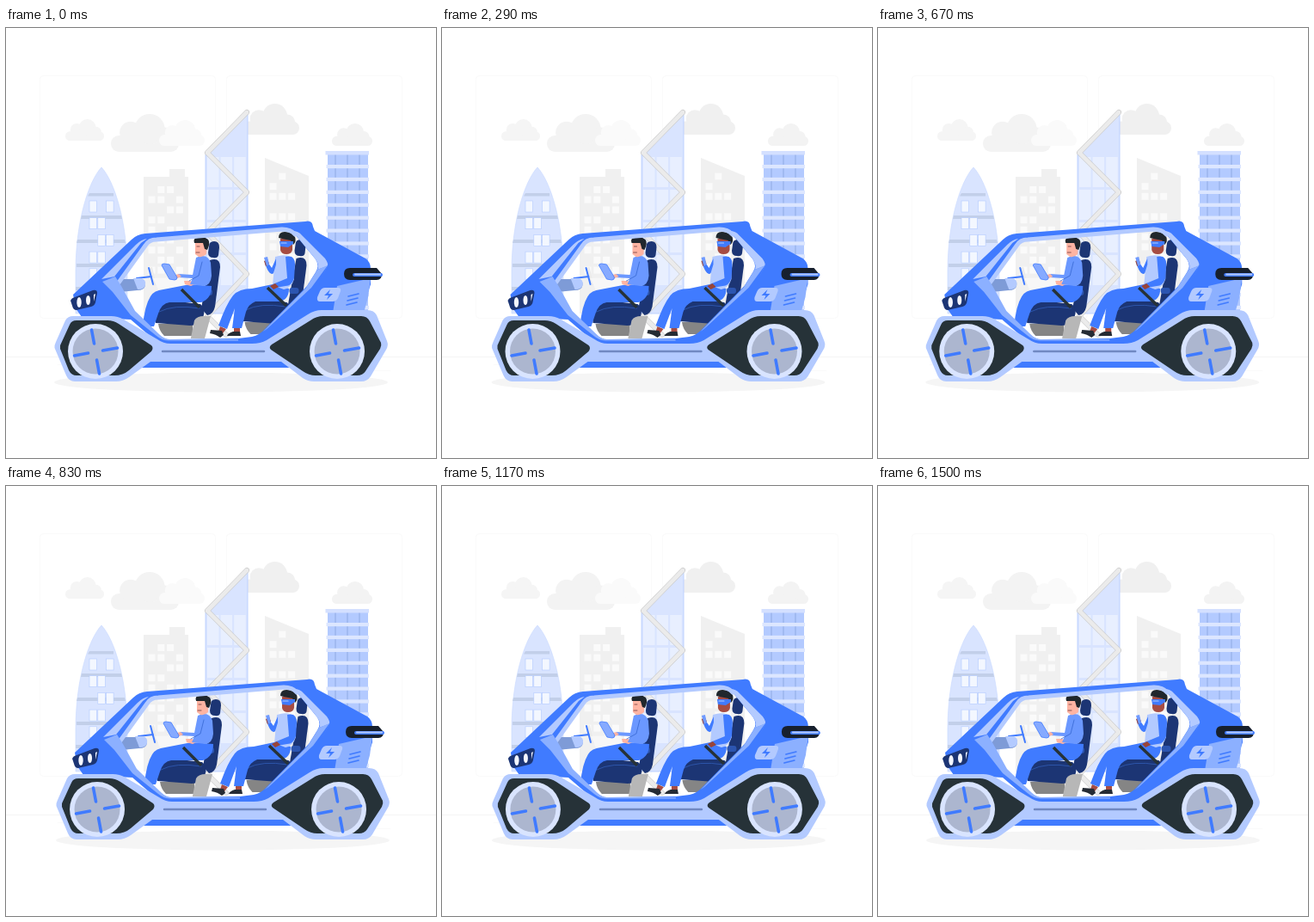
Recreate the animation shown at these times as an HTML page. Size 500x500 px, loop 1.54 s.

```html
<!DOCTYPE html>
<html lang="en">
<head>
<meta charset="utf-8">
<title>Electric car</title>
<style>
html, body { margin: 0; width: 100%; height: 100%; overflow: hidden; background: #fff; }
svg { display: block; width: 100vw; height: 100vh; }
.blue { fill: #407bff; } .mid { fill: #8cb0ff; } .light { fill: #b3caff; } .pale { fill: #d9e4ff; }
.navy { fill: #1c3574; } .dark { fill: #263238; }
.line { fill: none; stroke-linecap: round; stroke-linejoin: round; }
</style>
</head>
<body>
<svg viewBox="0 0 500 500">
  <defs>
    <g id="wheel">
      <circle r="32" class="pale"/><circle r="26.5" fill="#acb6cf"/>
      <path d="M-4.500-25L-1.500-9M8.500-1L25.500-4M1.500 10L4.500 26M-24.500 5L-8.500 2" class="line" stroke="#407bff" stroke-width="3.600"/>
    </g>
    <g id="seat">
      <path d="M177 344H217V358H184Q178 352 177 344Z" fill="#858585"/>
      <path d="M236 254Q236 248 242 248Q248 248 248 255L247 264Q246 268 241 267Q235 267 235 261Z" class="navy"/>
      <path d="M237 270Q249 266 249 278L243 324Q241 333 234 334L227 326Z" class="navy"/>
      <path d="M176 326Q180 317 191 317L226 321Q233 326 229 337Q225 346 214 346L174 343Q173 334 176 326Z" class="navy"/>
      <path d="M178 330Q195 321 225 326" class="line" stroke="#315eb8" stroke-width=".8"/>
      <rect x="229" y="304" width="11" height="7" rx="3" fill="#2c55b0"/>
    </g>
  </defs>

  <g class="line" stroke="#fafafa">
    <rect x="39.5" y="55.5" width="204" height="282" rx="4"/>
    <rect x="256.5" y="55.5" width="204" height="282" rx="4"/>
    <path d="M0 382.5H500" stroke="#f5f5f5"/><path d="M416 398.5H447M60 391.5H85"/>
  </g>
  <g id="clouds"></g>

  <path d="M111 162C96 178 81 225 81 283V332H141V283C141 225 126 178 111 162Z" class="pale" stroke="#c8d8ff" stroke-width=".6"/>
  <path d="M97 192H125V195.500H95ZM88 218H134L135 222H87ZM83 246H138L139 250H82ZM82 274H140V278H82ZM81 301H141V305H81Z" fill="#c2cfe9"/>
  <path d="M160 173H190V164H208V173H212V332H160Z" fill="#f0f0f0"/>
  <path d="M301 151L352 172V332H301Z" fill="#f0f0f0"/>
  <path d="M232 147L281 100V332H232Z" fill="#d9e4ff" stroke="#b3caff" stroke-width=".8"/>
  <rect x="374" y="146" width="47" height="186" fill="#b3caff"/>
  <g id="windows"></g>
  <path d="M280 98L234 145L280 191L234 238L280 286L234 335L256 357" class="line" stroke="#c7c7c7" stroke-width="6"/>
  <path d="M280 98L234 145L280 191L234 238L280 286L234 335L256 357" class="line" stroke="#ebebeb" stroke-width="4.800"/>

  <g id="car">
    <ellipse cx="250" cy="412" rx="194" ry="11.500" fill="#f5f5f5"/>

    <!-- dashboard -->
    <path d="M166 279L170 278L175 299L171 300Z" fill="#ebebeb"/>
    <path d="M171 291L206 290L211 302L177 304Z" fill="#f7f7f7"/>
    <path d="M152 291L169 289M166 279L171 298" class="line" stroke="#407bff" stroke-width="2"/>
    <path d="M122 292H154Q163 292 162 299Q161 305 153 305L132 307Q124 303 122 292Z" fill="#7e9bd7"/>
    <path d="M148 291H157Q163 292 162 299Q161 304 153 304Z" class="light"/>

    <!-- front passenger -->
    <use href="#seat"/>
    <path d="M215 360L219 340Q222 335 230 335H238L231 361H215Z" fill="#b7b7b7"/>
    <path d="M214 298L239 300Q239 315 227 319L190 319Q181 320 177 332L172 347H159Q161 323 168 312Q172 305 183 304Z" class="blue"/>
    <path d="M207 294L214 294L222 297L215 300L208 298Z" fill="#ffb4a2"/>
    <path d="M221 267Q234 261 238 273L239 288Q238 299 230 300L214 298L217 291L200 290V286L217 287Z" fill="#6b98ff"/>
    <path d="M228 272L224 288L213 294" class="line" stroke="#3767d2" stroke-width=".8"/>
    <path d="M220 250L234 249L233 263Q229 267 224 266L220 263Z" fill="#ffb4a2"/>
    <path d="M219 250Q217 244 223 244Q229 241 235 246Q238 250 234 258L231 257L229 250Z" fill="#20272d"/>
    <path d="M222 254H225M221 261H225" class="line" stroke="#6b3b3e" stroke-width=".8"/>
    <path d="M194 288L201 286L204 289L197 292Z" fill="#ffb4a2"/>
    <path d="M181 276Q181 274 184 274L190 275L199 290Q199 293 196 293L190 292Z" fill="#86aaff" stroke="#407bff" stroke-width=".8"/>
    <path d="M204 304L225 325" stroke="#263238" stroke-width="3.500"/>

    <!-- rear passenger -->
    <use href="#seat" x="100.500" y="-2"/>
    <path d="M249 347L256 350L252 355L247 353ZM265 348H272V354H265Z" fill="#a64c43"/>
    <path d="M238 351L251 352L253 357L249 360Q244 356 237 355ZM264 353H272L273 358H257Q258 355 264 353Z" fill="#252b34"/>
    <path d="M310 298L329 303Q329 316 318 318L290 318Q282 321 279 330L274 349H263L266 326L257 350L247 346Q256 321 264 311Q271 303 286 303Z" class="blue"/>
    <path d="M313 266Q328 261 335 270L335 292Q332 302 323 304L310 299Z" class="light"/>
    <path d="M325 266Q336 263 336 275L335 291Q332 300 325 300L313 302L310 298L327 291ZM314 275L311 285Q308 288 304 281L301 274L304 272L309 279L314 268Z" class="blue"/>
    <path d="M307 300L313 297L317 301L311 304ZM300 271L304 269L306 274L302 277Z" fill="#994438"/>
    <path d="M300 267L304 266L306 275L303 277Z" fill="#6f9aff"/>
    <path d="M319 245H333V258Q332 263 326 263Q320 263 319 258Z" fill="#a64c43"/>
    <path d="M317 244Q317 237 324 237Q333 237 336 243Q338 248 334 252L331 247L321 245Z" fill="#20272d"/>
    <path d="M318 248L334 248V251L328 255L319 254Z" class="blue"/>
    <path d="M320 250H326" class="line" stroke="#b3caff" stroke-width="1.200"/>
    <path d="M304 302L326 323" stroke="#263238" stroke-width="3.500"/>

    <!-- shell -->
    <path fill-rule="evenodd" class="blue" d="M78 310L146 246Q152 240 162 239L348 225Q356 223 357 231L359 236L418 268Q424 272 424 280V298L413 331L367 336L302 369H180L145 339L88 336L81 326Z
      M131 296L162 253Q166 246 175 246L321 234Q331 234 336 240L360 269Q365 277 360 284L350 300L301 350Q295 357 286 359L270 361L190 362Q184 362 178 357L149 330Z"/>
    <path d="M131 296L162 253Q166 246 175 246L321 234Q331 234 336 240" class="line" stroke="#b3caff" stroke-width="5"/>
    <path d="M333 236Q340 236 344 241L371 268Q376 275 373 277L362 281Q365 277 360 269Z" class="light"/>
    <path d="M374 276L363 299L318 340L299 353L349 302L362 281Z" class="mid"/>
    <path d="M374 276L364 299L319 342L299 354L355 302Z" class="blue"/>
    <path d="M111 292L151 252Q157 246 164 245L157 250L126 289Z" class="light"/>
    <path d="M112 295L127 289L134 300L150 329L178 356Q184 362 190 362H270V363.500H189Q181 363 175 358L145 334L124 307Z" class="mid"/>
    <path d="M385 300L424 291L421 313L416 331H380Z" class="mid"/>
    <path d="M398 312L410 309M397 317L409 314M396 322L408 319" class="line" stroke="#407bff" stroke-width="1.600"/>
    <path d="M371 302H386Q390 302 389 306L386 314Q384 318 380 318H365Q361 318 362 313L365 306Q367 302 371 302Z" class="light"/>
    <path d="M377 304L370 311H375L373 316L380 309H375Z" class="blue"/>
    <path d="M75 317Q76 314 80 313L101 305Q106 304 106 308L104 319Q103 323 99 324L82 328Q78 328 77 323Z" class="navy"/>
    <g fill="#f4f7ff">
      <ellipse cx="85" cy="319" rx="2.700" ry="6"/><ellipse cx="95.500" cy="316.500" rx="2.500" ry="5.500"/>
      <path d="M102 310L104 309L102 318Z"/>
    </g>
    <path d="M400 279H431L437 286Q437 293 431 293H400Q393 293 393 286Q393 279 400 279Z" fill="#17202e"/>
    <path d="M405 287H436" class="line" stroke="#407bff" stroke-width="4"/>
    <path d="M406 286.500H435" class="line" stroke="#b3caff" stroke-width="2"/>

    <!-- lower body -->
    <path d="M150 387H340V395H150Z" class="blue"/>
    <path d="M56.500 372Q56 369 58 365L69 340Q72 335 78 335H122Q130 335 137 339L176 362Q183 367 191 367H286Q296 367 303 363L351 333Q359 328 367 328H420Q428 328 431 334L443 364Q445 369 442 374L424 405Q420 411 413 411H358Q351 411 345 407L320 388H168L143 406Q136 411 128 411H80Q73 411 70 404Z" class="light"/>
    <path d="M63 373V369L74 345Q76 340 82 340H118Q125 340 131 344L169 369Q172 372 169 376L143 398Q136 404 126 404H82Q76 404 73 398Z" class="dark"/>
    <path d="M308 374Q305 371 309 368L354 340Q361 335 369 335H413Q420 335 423 341L436 366Q437 369 435 373L418 399Q415 404 408 404H360Q352 404 345 399Z" class="dark"/>
    <path d="M182 376H300" class="line" stroke="#7088c2" stroke-width="2.400"/>
    <use href="#wheel" x="104" y="376"/>
    <use href="#wheel" x="385" y="376"/>
  </g>
</svg>
<script>
const byId = id => document.getElementById(id);
const rect = (x, y, w, h, fill, more = "") => `<rect x="${x}" y="${y}" width="${w}" height="${h}" fill="${fill}" ${more}/>`;

// A cloud is a flat pill with three round lumps.
function cloud(x, base, w, h, fill) {
  const lump = (cx, cy, r) => `<circle cx="${x + w * cx}" cy="${base - h * cy}" r="${r}" fill="${fill}"/>`;
  return rect(x, base - h * .43, w, h * .43, fill, `rx="${h * .21}"`) +
    lump(.29, .51, h * .29) + lump(.57, .6, h * .4) + lump(.79, .4, h * .25);
}
byId("clouds").innerHTML = cloud(69, 131, 45, 25, "#f5f5f5") + cloud(122, 144, 79, 44, "#f3f3f3") +
  cloud(178, 137, 53, 30, "#fafafa") + cloud(275, 124, 66, 36, "#f0f0f0") + cloud(379, 137, 47, 26, "#f3f3f3");

// Each row is a string of flags, one per window.
function panes(x, y, dx, dy, w, h, fill, rows, more) {
  return rows.map((row, j) => [...row].map((on, i) =>
    on === "1" ? rect(x + i * dx, y + j * dy, w, h, fill, more) : "").join("")).join("");
}
let windows = panes(97, 201, 9.8, 19.7, 8.5, 13, "#f3f7ff", ["101", "110", "011", "110", "101"], 'stroke="#b3caff" stroke-width=".6"') +
  panes(165.5, 184, 10.8, 11.7, 8, 8, "#fafafa", ["0110", "1101", "0011", "1100", "1011", "0110", "1101", "0110", "1101"]) +
  panes(306.5, 168.5, 10.8, 11.7, 8, 8, "#fafafa", ["0100", "1000", "1110", "0000", "1110", "0110", "1011", "1101", "0110", "1101"]) +
  panes(234, 150, 15.6, 38, 13.5, 35, "#e8efff", ["111", "111", "111", "111"]);
for (const x of [383, 397, 411]) windows += rect(x - .5, 147, 1, 183, "#8fa9e4");
for (let y = 159; y < 330; y += 14.9) windows += rect(372.5, y, 49.5, 4.2, "#dce6ff");
windows += rect(371.5, 143, 50.5, 4.5, "#d4e0ff");
byId("windows").innerHTML = windows;

const LOOP = 1540, STEP = 1000 / 24, SHAKE = 1500, LEAD = 26;
const stops = [0, -1, 2, -4, 4, -4, 4, -4, 2, -1, 0];

function shake(ms) {
  const p = (ms % SHAKE) / SHAKE * 10, i = Math.floor(p);
  return stops[i] + (stops[i + 1] - stops[i]) * (p - i);
}
function draw(now) {
  const tick = Math.floor((now % LOOP + 5) / STEP);
  byId("car").setAttribute("transform", `translate(${shake(tick * STEP + LEAD) + .2} 0)`);
  requestAnimationFrame(draw);
}
requestAnimationFrame(draw);
</script>
</body>
</html>
```
